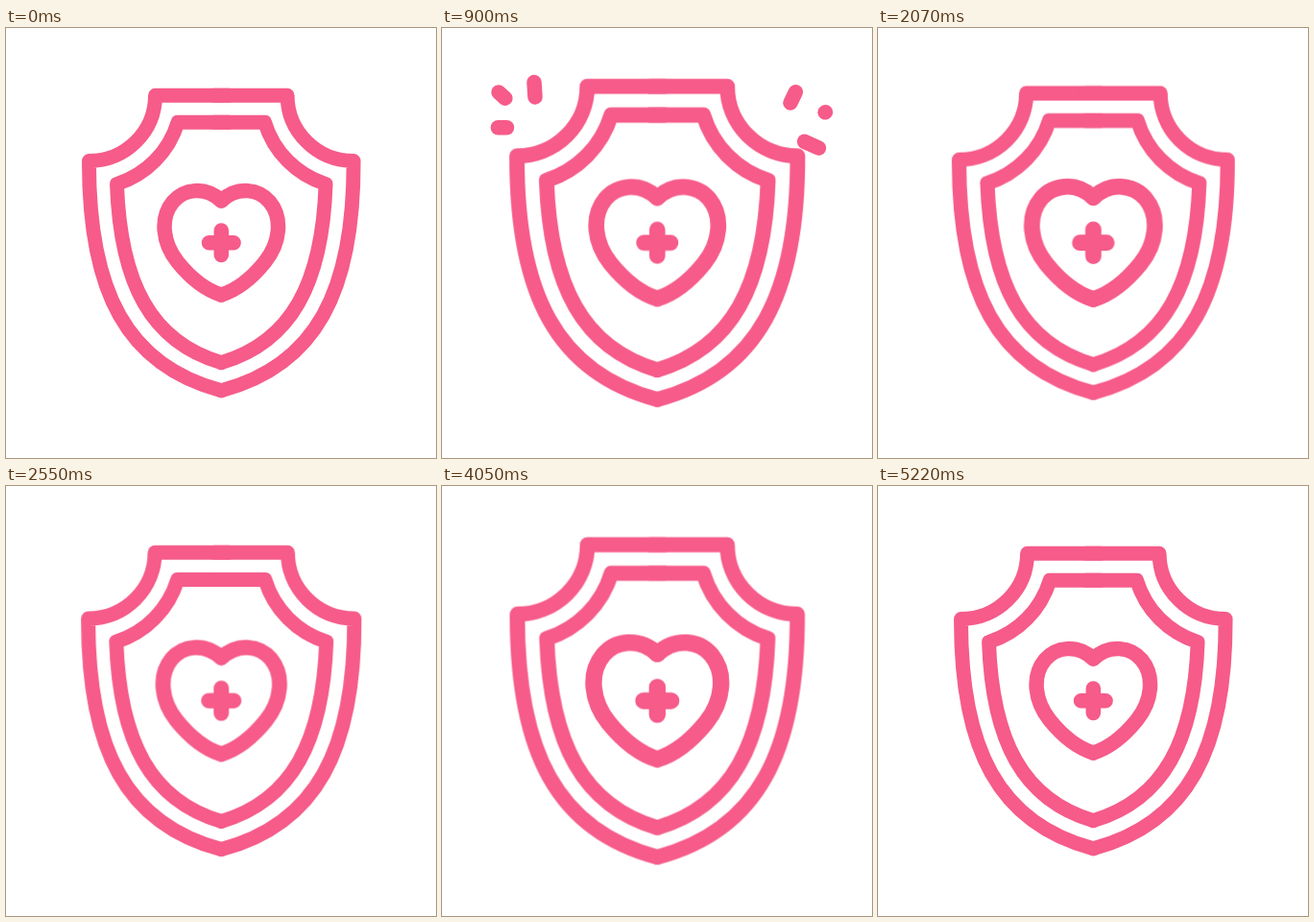
Animation of 448x448 px, one loop 5.4 s. Source, as an HTML page:

```html
<!DOCTYPE html>
<html lang="en">
<head>
<meta charset="utf-8">
<title>Health shield</title>
<style>
  html, body { margin: 0; width: 100%; height: 100%; overflow: hidden; background: #fff; }
  svg {
    display: block; width: 100%; height: 100%;
    fill: none; stroke: #f65b8a; stroke-width: 15.5;
    stroke-linecap: round; stroke-linejoin: round;
  }
  .shield, .heart {
    transform-origin: 224.3px 224px;
    animation: shield 5400ms cubic-bezier(.37, 0, .63, 1) infinite;
  }
  .shield { stroke-width: 14.9; }
  .heart { transform-origin: 224.3px 223px; animation-name: heart; }

  @keyframes shield {
    0%, 43.33%, 87.78%, 100% { transform: scale(1); }
    20%, 27.78%, 63.33%, 71.67% { transform: scale(1.065); }
  }
  @keyframes heart {
    0%, 96.67%, 100% { transform: scale(1); }
    29.44%, 75% { transform: scale(1.12); }
    50% { transform: scale(1.02); }
  }

  /* Each spark draws outward, then trims away from its inner end; twice per loop. */
  .sparks path {
    visibility: hidden;
    stroke-dasharray: 0 3;
    animation: draw 5400ms linear var(--in) infinite, trim 5400ms linear var(--out) infinite;
  }
  @keyframes draw {
    0%, 44.44% { stroke-dasharray: 0 3; visibility: visible; }
    4.44%, 48.89% { stroke-dasharray: 1 3; visibility: visible; }
    13.99%, 58.43% { stroke-dasharray: 1 3; visibility: visible; }
    14%, 44.43%, 58.44%, 100% { stroke-dasharray: 0 3; visibility: hidden; }
  }
  @keyframes trim {
    0%, 30.01%, 44.44%, 75.01%, 100% { stroke-dashoffset: 0; }
    2.96%, 47.4% { stroke-dashoffset: -1; }
    2.97%, 30%, 47.41%, 75% { stroke-dashoffset: -1.5; }
  }
</style>
</head>
<body>
<svg viewBox="0 0 448 448">
  <g class="shield">
    <g id="shieldHalf">
      <path d="M232 70.2H155.5A69 68.3 0 0 1 86.5 138.5C86 274 125.5 351.5 224.3 377.7"/>
      <path d="M232 98.3H179A96.5 96.5 0 0 1 115.5 162.5C119 266 151 327 224.3 348.7"/>
    </g>
    <use href="#shieldHalf" transform="matrix(-1 0 0 1 448.6 0)"/>
  </g>
  <g class="heart">
    <path id="heartHalf" d="M224.3 180C207 164 185 168 174 181C160 198 163 224 179 244C192 260 208 273 224.3 278"/>
    <use href="#heartHalf" transform="matrix(-1 0 0 1 448.6 0)"/>
    <path d="M211.5 223.7H237.1M224.3 210.9V236.5"/>
  </g>
  <g class="sparks">
    <path pathLength="1" d="M73 79.5L59 67" style="--in:480ms;--out:820ms"/>
    <path pathLength="1" d="M97 72L96 56.5" style="--in:600ms;--out:930ms"/>
    <path pathLength="1" d="M67.5 103.7H52" style="--in:760ms;--out:1110ms"/>
    <path pathLength="1" d="M363 78L370 63.5" style="--in:715ms;--out:985ms"/>
    <path pathLength="1" d="M384.5 93.7L399.5 87.7" style="--in:420ms;--out:745ms"/>
    <path pathLength="1" d="M377.5 118.3L392.5 125" style="--in:480ms;--out:900ms"/>
  </g>
</svg>
</body>
</html>
```
